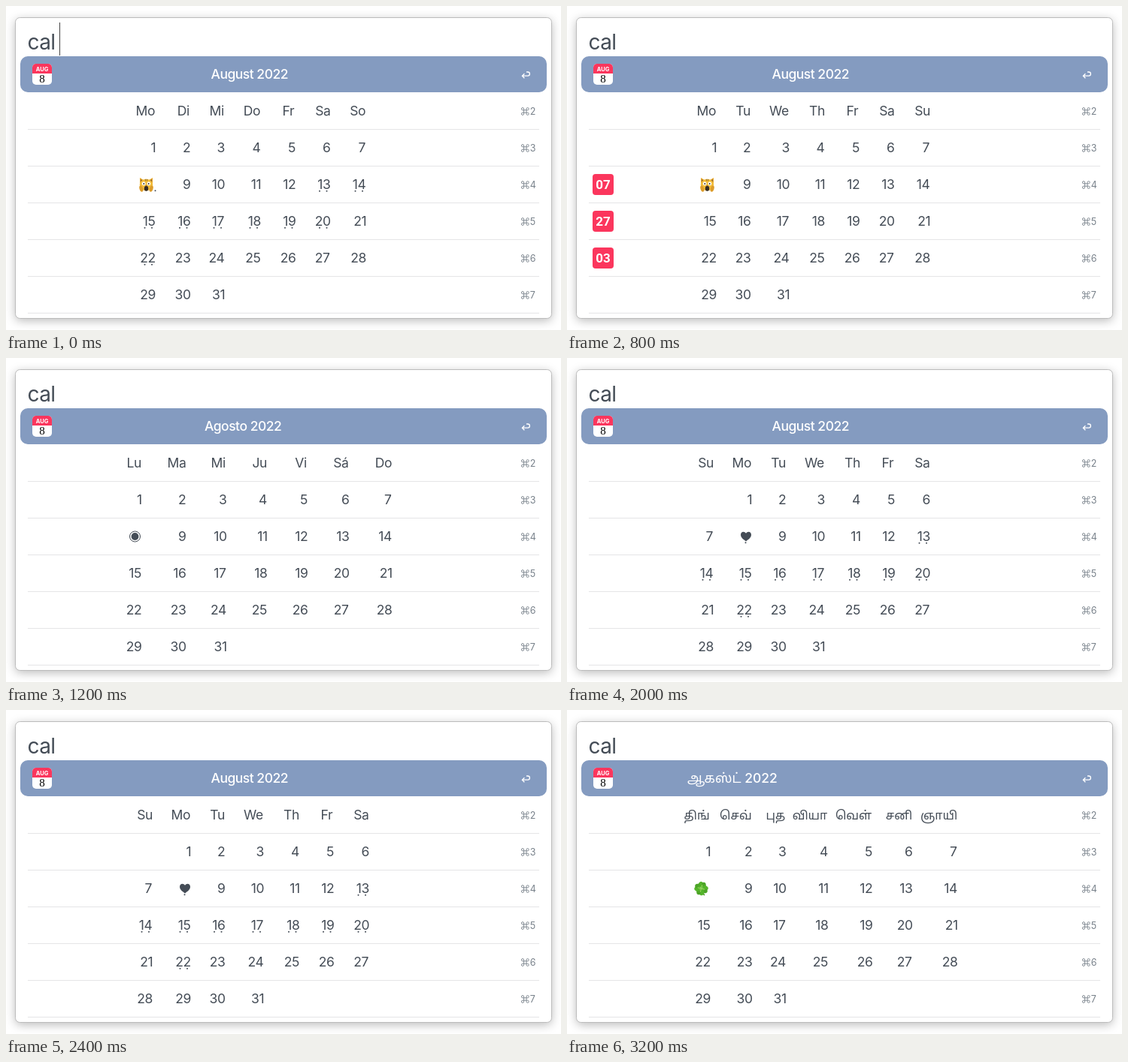
An HTML page with a canvas for the animation above (3600 ms loop, 738x432 px).

```html
<!DOCTYPE html>
<html lang="en">
<head>
<meta charset="utf-8">
<title>Calendar launcher</title>
<style>
html, body { margin: 0; width: 738px; height: 432px; overflow: hidden; background: #fff; }
canvas { display: block; }
</style>
</head>
<body>
<canvas id="stage" width="738" height="432"></canvas>
<script>
const ctx = document.getElementById('stage').getContext('2d');
const STEP = 400, LOOP = 3600;
const INK = '#444c56', RED = '#fb365d';
const SANS = 'Inter, "Noto Sans", "Noto Sans Tamil", sans-serif';
const ROW_H = 49, FIRST_ROW = 140;

const german = {
  title: 'August 2022', x: 272.5, days: 'Mo Di Mi Do Fr Sa So',
  heads: [198, 244, 290, 338, 384, 431, 478],
  cols: [198.5, 245, 290.5, 338.5, 385, 431, 478.5],
  mark: cat, markX: 186.5, dots: true, tick: 198.5
};
const english = {
  title: 'August 2022', x: 272.5, days: 'Mo Tu We Th Fr Sa Su',
  heads: [198, 243, 295, 342, 388, 435, 482],
  cols: [198.5, 244, 295.5, 342.5, 389, 435, 482.5],
  mark: cat, markX: 186.5
};
const badged = { ...english, badges: ['07', '27', '03'] };
const spanish = {
  title: 'Agosto 2022', x: 264, days: 'Lu Ma Mi Ju Vi Sá Do',
  heads: [179, 239, 292, 346, 400, 455, 513],
  cols: [180, 239, 293, 347, 401, 456, 513],
  mark: target, markX: 171.5
};
const sunday = {
  title: 'August 2022', x: 272.5, days: 'Su Mo Tu We Th Fr Sa', first: 1,
  heads: [194, 245, 290, 342, 389, 435, 482],
  cols: [194.5, 245.5, 291, 342.5, 390, 436, 482.5],
  mark: heart, markX: 238, dots: true, tick: 237.5
};
const dutch = {
  title: 'Augustus 2022', x: 172.5, days: 'Ma Di Wo Do Vr Za Zo',
  heads: [197, 244, 296, 344, 392, 439, 486],
  cols: [198, 244.5, 296.5, 345.5, 392.5, 439.5, 486.5],
  mark: bars, markX: 190
};
const tamil = {
  title: 'ஆகஸ்ட் 2022', x: 160, days: 'திங் செவ் புத வியா வெள் சனி ஞாயி',
  heads: [189, 245, 290, 346, 405, 458, 518], size: 16,
  cols: [190.5, 246, 291, 347, 406, 459, 519],
  mark: clover, markX: 178.5
};
const scenes = [german, english, badged, spanish, spanish, sunday, sunday, dutch, tamil];

function text(str, x, y, font, color, { align = 'left', spacing = 0 } = {}) {
  ctx.font = font;
  ctx.fillStyle = color;
  ctx.letterSpacing = spacing + 'px';
  ctx.textAlign = align;
  ctx.fillText(str, x, y);
}

// Aligns the visible right edge of a string.
function inkRight(str, right, y, size = 17.5) {
  const font = `400 ${size}px ${SANS}`, spacing = size === 17.5 ? -0.38 : 0;
  ctx.font = font;
  ctx.letterSpacing = spacing + 'px';
  ctx.textAlign = 'left';
  text(str, right - ctx.measureText(str).actualBoundingBoxRight, y, font, INK, { spacing });
}

function box(x, y, w, h, r, color) {
  ctx.fillStyle = color;
  ctx.beginPath();
  ctx.roundRect(x, y, w, h, r);
  ctx.fill();
}

function oval(x, y, rx, ry, color, turn = 0) {
  ctx.fillStyle = color;
  ctx.beginPath();
  ctx.ellipse(x, y, rx, ry, turn, 0, 7);
  ctx.fill();
}

function poly(points, color) {
  ctx.fillStyle = color;
  ctx.beginPath();
  for (const [x, y] of points) ctx.lineTo(x, y);
  ctx.fill();
}

function cat() {
  for (const s of [-1, 1]) {
    poly([[s * 8.5, -9], [s * 8.5, 0], [s * 2, -5]], '#e8a82c');
    poly([[s * 7.4, -7], [s * 7.4, -3], [s * 4.5, -5]], '#8d6535');
  }
  oval(0, 0.5, 8.7, 7.8, '#f3bd3b');
  for (const s of [-1, 1]) {
    oval(s * 3.4, -1.2, 2.4, 2.5, '#fff');
    oval(s * 3.2, -1.1, 0.9, 1, '#30271f');
    oval(s * 6.7, 5.6, 2.3, 4.2, '#dd9c2a', s * 0.3);
    oval(s * 1.1, -6, 0.5, 1.5, '#85602c');
  }
  oval(0, 5.2, 2.7, 3.5, '#332a24');
  oval(0, 1.7, 1, 0.7, '#95633b');
}

function target() {
  ctx.strokeStyle = INK;
  ctx.lineWidth = 1;
  ctx.beginPath();
  ctx.arc(0, 0, 7, 0, 7);
  ctx.stroke();
  oval(0, 0, 4.9, 4.9, INK);
}

function heart() {
  ctx.fillStyle = INK;
  ctx.beginPath();
  ctx.moveTo(0, -4.2);
  ctx.bezierCurveTo(2, -7.6, 7, -6.8, 7, -2.3);
  ctx.bezierCurveTo(7, 1.5, 3, 4, 0, 6.4);
  ctx.bezierCurveTo(-3, 4, -7, 1.5, -7, -2.3);
  ctx.bezierCurveTo(-7, -6.8, -2, -7.6, 0, -4.2);
  ctx.fill();
}

function bars() {
  ctx.fillStyle = INK;
  ctx.fillRect(-5.5, -5.7, 4.8, 1.5);
  ctx.fillRect(0.7, -5.7, 4.8, 1.5);
  for (let i = 1; i < 4; i++) ctx.fillRect(-5.5, -5.7 + i * 3.4, 11, 1.5);
}

function clover() {
  ctx.strokeStyle = '#4d9b25';
  ctx.lineWidth = 1.6;
  ctx.beginPath();
  ctx.moveTo(0, 0);
  ctx.quadraticCurveTo(1, 6, 4.5, 9);
  ctx.stroke();
  for (let i = 0; i < 4; i++) {
    ctx.save();
    ctx.rotate(i * Math.PI / 2 + 0.25);
    oval(-2.1, -5.5, 2.9, 3.5, '#55b52b', 0.35);
    oval(2.1, -5.5, 2.9, 3.5, '#4ca427', -0.35);
    poly([[0, 0], [-3.6, -4], [3.6, -4]], '#55b52b');
    ctx.strokeStyle = '#a6dc68';
    ctx.lineWidth = 0.8;
    ctx.beginPath();
    ctx.moveTo(0, 0);
    ctx.lineTo(0, -5);
    ctx.stroke();
    ctx.restore();
  }
}

function command(x, y) {
  const a = 1.7, c = 3.3, r = c - a;
  ctx.save();
  ctx.translate(x, y);
  ctx.strokeStyle = '#79828b';
  ctx.lineWidth = 0.9;
  for (let i = 0; i < 4; i++) {
    ctx.beginPath();
    ctx.moveTo(-c, a);
    ctx.lineTo(c, a);
    ctx.arc(c, c, r, -Math.PI / 2, Math.PI);
    ctx.stroke();
    ctx.rotate(Math.PI / 2);
  }
  ctx.restore();
}

function returnKey() {
  ctx.strokeStyle = '#fff';
  ctx.lineWidth = 1.3;
  ctx.beginPath();
  ctx.moveTo(692, 88);
  ctx.lineTo(693.8, 88);
  ctx.arc(693.8, 90.6, 2.6, -Math.PI / 2, Math.PI / 2);
  ctx.lineTo(686.5, 93.2);
  ctx.moveTo(689.4, 90.2);
  ctx.lineTo(686.4, 93.2);
  ctx.lineTo(689.4, 96.2);
  ctx.stroke();
}

function panel() {
  ctx.fillStyle = '#fff';
  ctx.fillRect(0, 0, 738, 432);
  ctx.save();
  ctx.shadowColor = 'rgba(0,0,0,.28)';
  ctx.shadowBlur = 13;
  ctx.shadowOffsetY = 3;
  box(12.5, 15.5, 713, 401, 6, '#fff');
  ctx.restore();
  ctx.strokeStyle = '#bcbcbc';
  ctx.lineWidth = 1;
  ctx.stroke();

  text('cal', 28.5, 58, `400 28px ${SANS}`, INK, { spacing: -0.6 });
  box(19, 67, 700, 48, 10, '#849bc0');
  box(35, 77, 26, 28, 5, '#fff');
  box(35, 77, 26, 13, [5, 5, 0, 0], RED);
  text('AUG', 48, 86.5, `700 7.5px ${SANS}`, '#fff', { align: 'center' });
  text('8', 48, 102, '400 15px "Liberation Serif", serif', '#000', { align: 'center' });
  returnKey();

  for (let i = 0; i < 6; i++) {
    const y = FIRST_ROW + i * ROW_H;
    ctx.fillStyle = '#e5e5e6';
    ctx.fillRect(29, y + 24, 680, 1);
    command(690.3, y + 0.5);
    text(i + 2, 696.8, y + 5, `400 12.5px ${SANS}`, '#79828b');
  }
}

function month(s) {
  text(s.title, s.x, 97, `500 17.5px ${SANS}`, '#fff', { spacing: s.size ? 0 : -0.5 });
  s.days.split(' ').forEach((d, i) => inkRight(d, s.heads[i], 146.3, s.size));
  for (let day = 1; day <= 31; day++) {
    const cell = day - 1 + (s.first || 0);
    const right = s.cols[cell % 7];
    const y = FIRST_ROW + ROW_H * (1 + Math.floor(cell / 7));
    if (day === 8) {
      ctx.save();
      ctx.translate(s.markX, y);
      s.mark();
      ctx.restore();
      if (s.dots) oval(s.tick, y + 8.3, 1, 1, INK);
      continue;
    }
    inkRight(String(day), right, y + 6.3);
    if (s.dots && (day >= 13 && day <= 20 || day === 22)) {
      oval(right - 4.5, y + 8.7, 1, 1, INK);
      oval(right - 14, y + 8.7, 1, 1, INK);
    }
  }
  (s.badges || []).forEach((b, i) => {
    const y = 224 + i * ROW_H;
    box(34, y, 28, 28, 4, RED);
    text(b, 48, y + 20, '700 17px Roboto, sans-serif', '#fff', { align: 'center' });
  });
}

function frame(now) {
  const t = now % LOOP;
  panel();
  month(scenes[Math.floor(t / STEP)]);
  if (t < 2 * STEP) {
    ctx.fillStyle = '#454545';
    ctx.fillRect(71, 22, 1, 44);
  }
  requestAnimationFrame(frame);
}
frame(performance.now());
</script>
</body>
</html>
```
